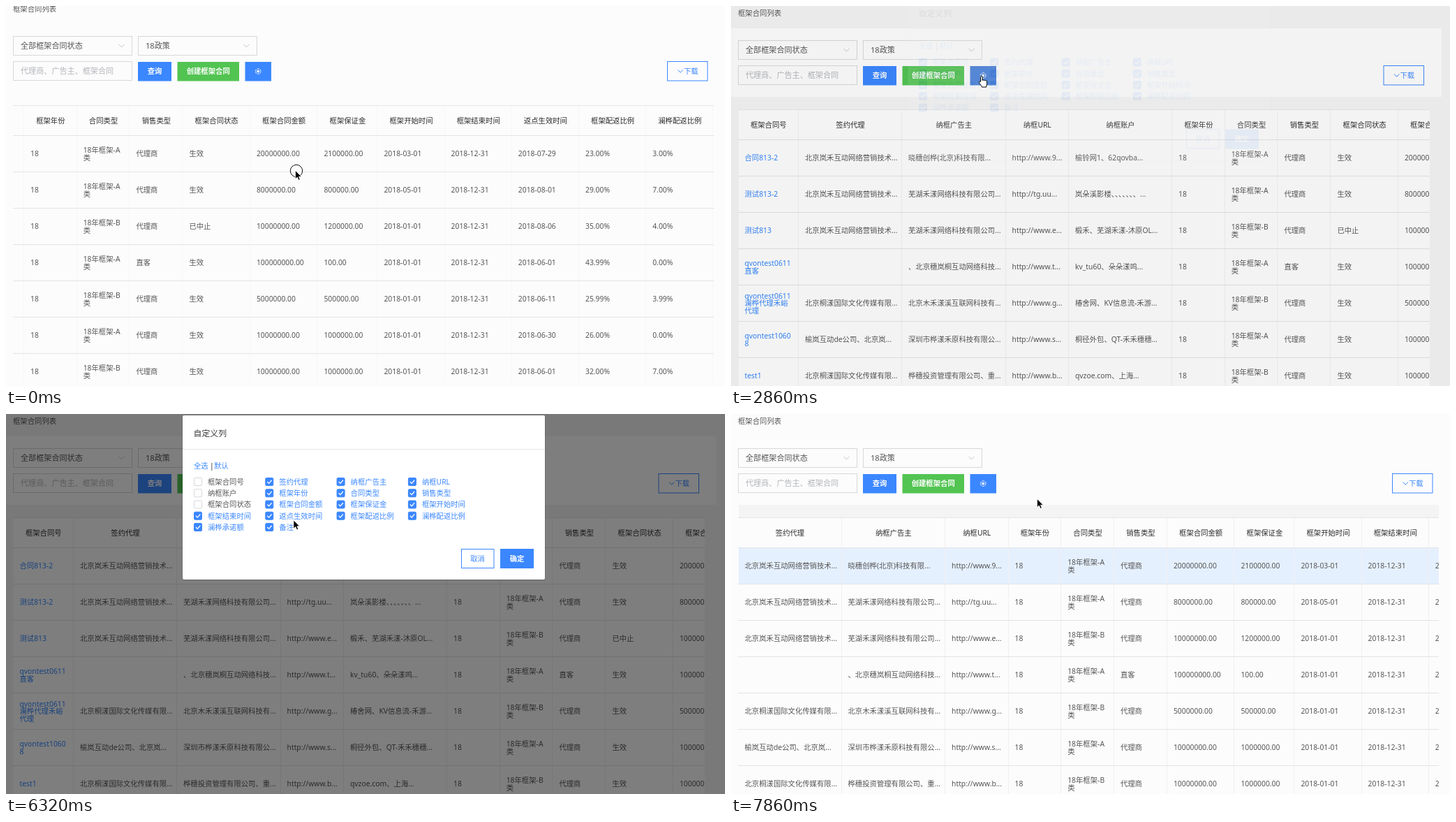
These frames come from a looping animation (1030x544 px, 8000 ms). An HTML page:

```html
<!DOCTYPE html>
<html lang="zh">
<head>
<meta charset="utf-8">
<title>框架合同列表</title>
<style>
html, body { margin: 0; width: 100%; height: 100%; overflow: hidden; background: #fcfcfd; }
svg { display: block; width: 1030px; height: 544px; }
text { font: 10.35px "Noto Sans", "Noto Sans CJK SC", "Noto Sans CJK", sans-serif; fill: #565656; white-space: pre; }
.head { fill: #2c2c2c; font-weight: 500; }
.link { fill: #2f83fa; font-weight: 500; }
.bold { fill: #fff; font-weight: 700; }
.blue { fill: #3b87ff; font-weight: 500; }
.field { font-size: 11.1px; }
.hint { font-size: 11.1px; fill: #b4b6ba; }
.title { font-size: 11.9px; fill: #3a3a3a; }
.mid { text-anchor: middle; }
</style>
</head>
<body>
<svg id="stage" viewBox="0 0 1030 544" xmlns="http://www.w3.org/2000/svg"></svg>
<script>
const LOOP = 8000, BLUE = '#3b87ff', LEFT = 10.5;
const stage = document.getElementById('stage');

function el(parent, tag, attrs = {}) {
  const node = document.createElementNS('http://www.w3.org/2000/svg', tag);
  for (const k in attrs) node.setAttribute(k, attrs[k]);
  return parent.appendChild(node);
}
const group = (parent, attrs) => el(parent, 'g', attrs);
const rect = (parent, x, y, width, height, fill, more) =>
  el(parent, 'rect', { x, y, width, height, fill, ...more });
const outline = (parent, x, y, w, h, stroke, fill = 'none') =>
  rect(parent, x + .5, y + .5, w - 1, h - 1, fill, { stroke });
const line = (parent, d, stroke, width = 1) =>
  el(parent, 'path', { d, stroke, 'stroke-width': width, fill: 'none' });

// y is the vertical centre of the glyphs
function label(parent, x, y, str, cls = '') {
  const size = /field|hint/.test(cls) ? 11.1 : /title/.test(cls) ? 11.9 : 10.35;
  const node = el(parent, 'text', { x, y: y + size * .38, class: cls });
  node.textContent = str;
  return node;
}
const show = (node, on) => node.setAttribute('visibility', on ? 'visible' : 'hidden');
const move = (node, x, y) => node.setAttribute('transform', `translate(${x} ${y})`);

// ---- table data: "^" breaks a line ----
const heads = ['框架合同号', '签约代理', '纳框广告主', '纳框URL', '纳框账户', '框架年份', '合同类型', '销售类型',
  '框架合同状态', '框架合同金额', '框架保证金', '框架开始时间', '框架结束时间', '返点生效时间', '框架配返比例', '澜桦配返比例'];
const widths = [86.5, 148, 148.5, 90.5, 148, 75.7, 75.7, 76, 96.5, 96.5, 86, 96.2, 96.2, 96.2, 96.2, 96.2];
const agentA = '北京岚禾互动网络营销技术...', agentB = '北京桐漾国际文化传媒有限...';
const rows = [
  `合同813-2|${agentA}|晓穗创桦(北京)科技有限...|9|榆铃网1、62qovba...|A|代理商|生效|20000000|2100000|03-01|07-29|23.00|3.00`,
  `测试813-2|${agentA}|芜湖禾漾网络科技有限公司...|tg.uu|岚朵溪影楼、、、、、、、...|A|代理商|生效|8000000|800000|05-01|08-01|29.00|7.00`,
  `测试813|${agentA}|芜湖禾漾网络科技有限公司...|e|椴禾、芜湖禾漾-沐原OL...|B|代理商|已中止|10000000|1200000|01-01|08-06|35.00|4.00`,
  `qvontest0611^直客||、北京穗岚桐互动网络科技...|t|kv_tu60、朵朵漾鸣...|A|直客|生效|100000000|100|01-01|06-01|43.99|0.00`,
  `qvontest0611^澜桦代理禾峪^代理|${agentB}|北京木禾漾溪互联网科技有...|g|椿舍网、KV信息流-禾游...|B|代理商|生效|5000000|500000|01-01|06-11|25.99|3.99`,
  `qvontest1060^8|榆岚互动de公司、北京岚...|深圳市桦漾禾原科技有限公...|s|桐径外包、QT-禾禾穗穗...|A|代理商|生效|10000000|1000000|01-01|06-30|26.00|0.00`,
  `test1|${agentB}|桦穗投资管理有限公司、重...|b|qvzoe.com、上海...|B|代理商|生效|10000000|1000000|01-01|06-01|32.00|7.00`
].map(r => {
  const [no, agent, client, url, acct, type, sale, state, sum, deposit, from, back, rate, rate2] = r.split('|');
  const host = url.length > 1 ? url : 'www.' + url;
  return [no, agent, client, `http://${host}...`, acct, '18', `18年框架-${type}^类`, sale, state,
    sum + '.00', deposit + '.00', '2018-' + from, '2018-12-31', '2018-' + back, rate + '%', rate2 + '%'];
});

function makeTable(parent, hidden) {
  const g = group(parent), rules = group(g);
  let x = LEFT;
  heads.forEach((head, c) => {
    if (hidden.includes(c)) return;
    label(g, x + widths[c] / 2, 170, head, 'head mid');
    rows.forEach((row, r) => {
      const parts = row[c].split('^');
      parts.forEach((s, i) => label(g, x + 9, 217.5 + r * 52 + (i - (parts.length - 1) / 2) * 10.4, s, c ? '' : 'link'));
    });
    x += widths[c];
    rect(rules, Math.round(x) - 1, 149, 1, 395, '#f0f0f1');
  });
  return { g, rules };
}

// ---- page ----
const defs = el(stage, 'defs');
const clip = rect(el(defs, 'clipPath', { id: 'view' }), 10, 0, 1004, 560, '#000');
rect(stage, 0, 0, 1030, 544, '#fcfcfd');

const shade = group(stage);
rect(shade, 0, 0, 1030, 544, '#f4f4f4');
rect(shade, 0, 32, 1018, 98, '#fdfdfd');
rect(shade, 11, 148, 990, 396, '#fdfdfd');
const strip = rect(stage, 11, 130, 1003, 18, '#f4f4f5');

const page = group(stage);
label(page, 10, 10.5, '框架合同列表');
function select(x, str) {
  outline(page, x, 49, 171, 28, '#d8d8da');
  label(page, x + 11, 63, str, 'field');
  line(page, `M${x + 151.5} 61l4 4 4-4`, '#c3c5ca');
}
select(10, '全部框架合同状态');
select(189, '18政策');
outline(page, 10, 85, 171, 28, '#d8d8da');
label(page, 21, 99, '代理商、广告主、框架合同', 'hint');
rect(page, 189, 86, 48, 27.5, BLUE);
label(page, 213, 99.5, '查询', 'bold mid');
rect(page, 245.5, 86, 88.5, 27.5, '#52c452');
label(page, 289.7, 99.5, '创建框架合同', 'bold mid');
const gear = rect(page, 342.5, 86, 37.5, 27.5, BLUE);
el(page, 'circle', { cx: 361.2, cy: 99.6, r: 3.8, fill: 'none', stroke: '#fff', 'stroke-dasharray': '3 1' });
el(page, 'circle', { cx: 361.2, cy: 99.6, r: 1.9, fill: '#fff' });

const download = group(page);
outline(download, 947, 85, 58.5, 28.5, BLUE);
line(download, 'M962.5 97.5l3.7 3.7 3.7-3.7', BLUE);
label(download, 971, 99.5, '下载', 'blue');

const view = group(page, { 'clip-path': 'url(#view)' });
const hoverRow = rect(view, 11, 192, 1003, 51, '#e5f0fe');
const full = makeTable(view, []);
const short = makeTable(view, [0, 4, 8]);
rect(view, 10, 148, 1004, 1, '#e6e6e8');
for (let i = 0; i < 7; i++) rect(view, 10, 191 + i * 52, 1004, 1, '#e4e4e6');

// ---- dialog ----
const mask = rect(stage, 0, 0, 1030, 544, '#000');
const dialog = group(stage);
rect(dialog, 252.5, 2.5, 520, 235.5, '#000', { rx: 3, opacity: .22 });
rect(dialog, 253, 2, 519, 235, '#fff', { rx: 2 });
rect(dialog, 253, 50, 519, 1, '#e6e8ec');
label(dialog, 268.5, 27, '自定义列', 'title');
label(dialog, 269, 74, '全选', 'blue');
label(dialog, 292, 74, '|', 'head');
const preset = label(dialog, 298, 74, '默认', 'blue');

const options = [...heads.slice(0, 4), '纳框账户', '框架年份', '合同类型', '销售类型', ...heads.slice(8, 12),
  ...heads.slice(12), '澜桦承诺额', '备注'];
const checks = options.map((name, i) => {
  const x = 269 + (i % 4) * 102.3, y = 97 + Math.floor(i / 4) * 16.25;
  const box = rect(dialog, x + .5, y - 5.5, 11, 11, BLUE, { rx: 1.5 });
  const tick = line(dialog, `M${x + 3} ${y}l2.3 2.4 4-4.6`, '#fff', 1.3);
  return { box, tick, text: label(dialog, x + 20, y, name) };
});
function setCheck({ box, tick, text }, on) {
  box.setAttribute('fill', on ? BLUE : '#fff');
  box.setAttribute('stroke', on ? BLUE : '#d5d7dc');
  show(tick, on);
  text.setAttribute('class', on ? 'blue' : '');
}
outline(dialog, 652, 193, 47.5, 28, BLUE);
label(dialog, 675.5, 207, '取消', 'blue mid');
const confirm = rect(dialog, 708, 193, 48, 28, BLUE);
label(dialog, 732, 207, '确定', 'bold mid');

// ---- pointer ----
const pointer = group(stage);
const ring = el(pointer, 'circle', { r: 8.7, fill: '#fff', 'fill-opacity': .35, stroke: '#111' });
const arrow = el(pointer, 'path', {
  d: 'M0 0V12.2L2.8 9.6 4.7 13.8 6.8 12.9 5 8.8H8.8Z', fill: '#000', stroke: '#fff', 'stroke-width': .8
});
const hand = el(pointer, 'path', {
  d: 'M-1.4 8V1.2a1.3 1.3 0 0 1 2.6 0V6c.4-.9 2.1-.8 2.4.2.5-.8 2-.6 2.2.4.6-.6 1.9-.2 1.9 1V11c0 1.8-1.2 2.6-1.2 4.6H.6c-.3-1.6-2.6-3.4-4.2-6.6-.5-1.1.9-2.2 2.2-1z',
  fill: '#fff', stroke: '#000', 'stroke-linejoin': 'round'
});

// ---- timing ----
const bursts = [[150, 1060, 7], [1210, 1670, 4], [2270, 3190, 7], [3520, 3960, 4], [4260, 4410, 2],
  [4710, 5740, 8], [5880, 6910, 8], [7210, 7860, 5]];
const steps = bursts.flatMap(([a, b, n]) => Array.from({ length: n }, (_, i) =>
  a + (b - a) * i / (n - 1) - (i > 0 && i < n - 1 ? 24 : 0)));
const snap = t => steps.reduce((last, s) => s <= t ? s : last, 0);

// keys: [time, ...values], eased between neighbours
function track(keys, t) {
  const i = keys.findIndex(k => k[0] > t);
  if (i < 0) return keys[keys.length - 1].slice(1);
  if (i === 0) return keys[0].slice(1);
  const a = keys[i - 1], b = keys[i], u = (t - a[0]) / (b[0] - a[0]), e = u * u * (3 - 2 * u);
  return a.slice(1).map((v, j) => v + (b[j + 1] - v) * e);
}
const within = (spans, t) => spans.some(([a, b]) => t >= a && t < b);

const scrollX = [[0, 606], [429, 0]];
const scrollY = [[430, -6], [740, 0]];
const fadeKeys = [[2710, 0], [2855, .08], [2862, .08], [3013, .75], [3190, 1],
  [7210, 1], [7345, .96], [7355, .96], [7511, .4], [7670, 0]];
const path = [[430, 414.5, 235.5], [1060, 374.5, 122.5], [1100, 374.5, 122.5], [1490, 360, 95], [1670, 359, 100.5],
  [3400, 359, 100.5], [3960, 304, 78], [4250, 304, 78], [4260, 305.5, 78], [4410, 304, 78], [4600, 304, 78],
  [4900, 311.5, 93], [5130, 311.5, 93], [5420, 310, 110], [5570, 310, 110], [5740, 310, 121.5], [5880, 310, 125],
  [6150, 310, 125], [6600, 715, 232], [6910, 727, 207.5], [7350, 727, 207.5], [7860, 438.5, 121.5]];
const handTimes = [[1480, 3600], [3900, 4750], [4900, 6200], [6800, 7450]];
const clicks = [[0, 150], [2270, 2370], [4900, 5100], [5390, 5540], [5990, 6120], [7210, 7340]];
const unchecked = { 0: 5100, 4: 5540, 8: 6120 };

function draw(time) {
  const t = snap(time);
  const [fade] = track(fadeKeys, t);
  const open = fade > 0, swapped = t > 7300;

  move(page, 0, track(scrollY, t)[0]);
  move(download, open ? -12.5 : 0, 0);
  clip.setAttribute('width', open ? 991 : 1004);
  show(shade, open);
  show(strip, swapped && !open);
  show(hoverRow, t > 7480);
  show(full.g, !swapped);
  show(short.g, swapped);
  full.rules.setAttribute('opacity', open ? 1 : .35);
  move(full.g, -track(scrollX, t)[0], 0);
  gear.setAttribute('fill', t >= 2270 && t < 7500 ? '#4a82da' : BLUE);

  mask.setAttribute('opacity', fade * .5);
  dialog.setAttribute('opacity', fade);
  move(dialog, 0, -18 * (1 - fade));
  checks.forEach((c, i) => setCheck(c, !(t >= unchecked[i])));
  preset.setAttribute('opacity', within([[3900, 4700]], t) ? .75 : 1);
  confirm.setAttribute('fill', t >= 6900 ? '#6ca2fb' : BLUE);

  const isHand = within(handTimes, t);
  move(pointer, ...track(path, t));
  move(ring, 1.5, isHand ? 2 : .5);
  show(ring, within(clicks, t));
  show(hand, isHand);
  show(arrow, !isHand);
}

const start = performance.now();
function tick() {
  draw((performance.now() - start) % LOOP);
  requestAnimationFrame(tick);
}
tick();
</script>
</body>
</html>
```
